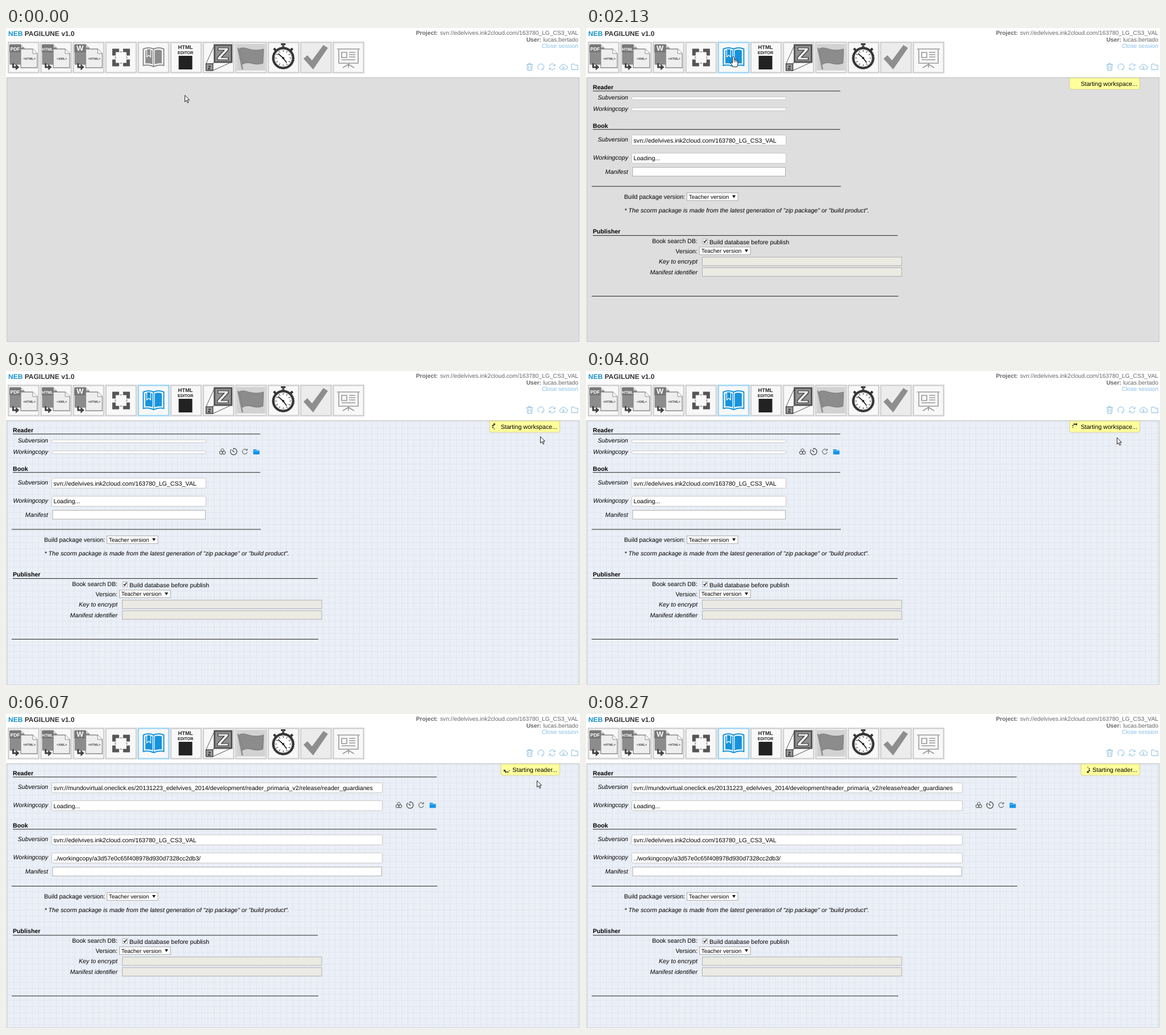
An HTML page for the animation above (8390 ms loop, 1009x555 px).

```html
<!DOCTYPE html>
<html lang="en">
<head>
<meta charset="utf-8">
<title>Workspace start-up</title>
<style>
  html, body { margin: 0; width: 100%; height: 100%; overflow: hidden; background: #fff; }
  svg { display: block; }
  text { font-family: "Liberation Sans", Arial, sans-serif; font-size: 10.65px; text-rendering: geometricPrecision; white-space: pre; }
  .b { font-weight: bold; }
  .i { font-style: italic; }
  .title { font-size: 12px; fill: #333; }
  .title tspan { fill: #1590cc; }
  .head { font-size: 10.3px; fill: #666; }
  .link { fill: #86bfe4; }
  .small { font-size: 10px; }
  .tip { font-size: 9px; fill: #555; }
</style>
</head>
<body>
<svg id="stage" width="1009" height="555" viewBox="0 0 1009 555"></svg>
<script>
const LOOP = 8390, STEP = 200 / 3;
const CLICK = 1800, FORM = 2000, NOTICE = 2130, IMAGES = 2200, READER = 6070;
const BOOK_URL = 'svn://edelvives.ink2cloud.com/163780_LG_CS3_VAL';
const READER_URL = 'svn://mundovirtual.oneclick.es/20131223_edelvives_2014/development/reader_primaria_v2/release/reader_guardianes';

const text = (x, y, s, cls = '', attrs = '') => `<text x="${x}" y="${y}" class="${cls}" ${attrs}>${s}</text>`;
const right = (x, y, s, cls) => text(x, y, s, cls, 'text-anchor="end"');
const mid = (x, y, s, size, fill) =>
  text(x, y, s, 'b', `text-anchor="middle" style="font-size:${size}px" fill="${fill}"`);
const rect = (x, y, w, h, fill, stroke = 'none', attrs = '') =>
  `<rect x="${x}" y="${y}" width="${w}" height="${h}" fill="${fill}" stroke="${stroke}" ${attrs}/>`;
const path = (d, fill = 'none', stroke = 'none', width = 1) =>
  `<path d="${d}" fill="${fill}" stroke="${stroke}" stroke-width="${width}"/>`;
const circle = (x, y, r, fill, stroke = 'none', attrs = '') =>
  `<circle cx="${x}" cy="${y}" r="${r}" fill="${fill}" stroke="${stroke}" ${attrs}/>`;
const group = (body, attrs) => `<g ${attrs}>${body}</g>`;
const at = (x, y, body) => group(body, `transform="translate(${x} ${y})"`);
const spun = (count, body) => [...Array(count)].map((_, k) =>
  group(body, `transform="rotate(${k * 360 / count})"`)).join('');

// Toolbar icons, drawn inside a 56 x 56 button
const convert = (from, fromSize, to) =>
  path('M4 5H23L29 11V40H4Z', '#8c8c8c', '#777') + path('M23 5V11H29', '#ddd', '#777') +
  rect(3, 6, 20, 13, '#777') + mid(13, 16, from, fromSize, '#fff') +
  path('M23 13H44L52 21V46H23Z', '#eee', '#8a8a8a', 1.3) + path('M44 13V21H52', '#fff', '#8a8a8a') +
  mid(38, 32.2, `&lt;${to}>`, 5.5, '#444') +
  path('M9.5 38V45H15', 'none', '#444', 3) + path('M14 39.5L20.5 45 14 50.5Z', '#444');

const corners = at(28, 28, spun(4,
  path('M-12.5 -3.5V-12.5H-3.5', 'none', '#555', 6) + path('M-2 -10H2', 'none', '#aaa', 2)));

const book = color =>
  path('M10 13Q19 9 28 13Q37 9 46 13V42Q37 40 28 44Q19 40 10 42Z', '#fff', color, 2) +
  path('M13.5 15.5Q20 13 26 15.5V40Q20 37.5 13.5 38.5Z', color) +
  path('M16 13V27L19.5 24 23 27V13Z', color, '#fff', 1.2) +
  path('M30 15.5Q36 13 42.5 15.5V38.5Q36 37.5 30 40Z', color) +
  path('M28 13V44', 'none', color, 1.4);

const editor = mid(27, 13, 'HTML', 9.3, '#222') + mid(27, 21.5, 'EDITOR', 7.3, '#222') + rect(15, 25, 24, 24, '#222');

const zoom =
  path('M6 39L21 6M18 39L51 6M6 51L21 36M18 51L51 36', 'none', '#555') +
  rect(21, 6, 30, 30, '#909090', '#555', 'stroke-width="3"') +
  path('M27 11H45V15L33 28H45V32H26V28L38 15H27Z', '#eee', '#333', 1.2) +
  rect(6, 39, 12, 12, '#999', '#444', 'stroke-width="1.5"') + mid(12, 49, 'Z', 9, '#222');

const flag = rect(3, 4, 50, 47, '#d2d2d2') +
  path('M5 11L13 49', 'none', '#8c8c8c', 2.5) +
  path('M7 13C18 6 26 20 50 13L49 38C32 44 25 32 13 40Z', '#8c8c8c', '#777');

const stopwatch = rect(23.5, 3, 8, 3, '#333') + rect(25.5, 5, 4, 5, '#555') +
  path('M11 12L15 16M44 12L40 16', 'none', '#333', 4) +
  at(27.5, 29, circle(0, 0, 17.5, '#fff', '#333', 'stroke-width="4"') +
    circle(0, 0, 19.5, 'none', '#555', 'stroke-dasharray="2 2"') +
    circle(0, 0, 15, 'none', '#bbb') + spun(12, path('M0 -14V-11', 'none', '#333')) +
    path('M-9 -8L0 0 6 8', 'none', '#222', 1.8) + circle(0, 0, 2, '#222'));

const tick = rect(3, 3, 50, 50, '#ececec') + path('M6 30L13 24 21 33 41 6 49 11 23 49Z', '#8e8e8e');

const board = path('M8 13H48M11 14V38H45V14M28 38V46M28 40L18 46M28 40L38 46' +
  'M16 19H25V28H16ZM29 19H40M29 23H40M29 27H40M16 32H40', 'none', '#999', 1.6);

const icons = [convert('PDF', 8.5, 'HTML'), convert('HTML', 7, 'XML'), convert('W', 13, 'HTML'),
  corners, book('#8c8c8c'), editor, zoom, flag, stopwatch, tick, board];
const button = (n, icon, border = '#d2d2d2') =>
  at(3 + n * 57.1, 24, rect(1.3, 1.3, 53.4, 53.4, '#f8f8f8', border, 'stroke-width="2.6"') + icon);

// Small line icons, centred on the origin
const actions = [
  'M-5.5 -4H5.5M-2 -4V-6H2V-4M-4.5 -4L-3.7 6H3.7L4.5 -4M-1.7 -2V4M1.7 -2V4',
  'M-3 4.6A5.4 5.4 0 1 1 3 4.6M.5 5H3.3V2',
  'M-5 -1A5 5 0 0 1 4.5 -2.5M5 -5V-2H2M5 1A5 5 0 0 1 -4.5 2.5M-5 5V2H-2',
  'M-3.5 4.5A3 3 0 0 1 -4 -1.5A4.2 4.2 0 0 1 4 -2A3.2 3.2 0 0 1 3.7 4.5ZM0 -2V3M-2 1L0 3 2 1',
  'M-5.5 5V-5H-1L.5 -3H5.5V5Z'
].map((d, k) => at(920.5 + k * 19.8, 68.5, path(d, 'none', '#84badf'))).join('');

const header = text(4, 14, '<tspan>NEB</tspan> PAGILUNE v1.0', 'b title') +
  right(759, 12, 'Project:', 'head b') + right(1006, 12, BOOK_URL, 'head') +
  right(941, 23.5, 'User:', 'head b') + right(1006, 23.5, 'lucas.bertado', 'head') +
  right(1006, 35, 'Close session', 'head link') + actions;

// Form pieces
const rule = (x, y, end) => path(`M${x} ${y}H${end}`, 'none', '#222');
const field = (y, w, h, value = '') =>
  rect(80.5, y, w, h, '#fff', '#c6c6c6', 'rx="2"') + text(83.5, y + h / 2 + 4, value);
const select = (x, y) => rect(x, y, 89.5, 13.5, '#fff', '#a9a9a9') +
  text(x + 3.2, y + 10.4, 'Teacher version', 'small') + path(`M${x + 79.5} ${y + 4.2}h6l-3 5z`, '#111');
const locked = y => rect(204.5, y, 350.5, 15, '#ebebe4', '#b0b0b0');

const rowIcons = (x, y) =>
  at(x, y + .5, spun(3, circle(0, -2.8, 2.7, 'none', '#444', 'stroke-width=".9"'))) +
  at(x + 19.6, y, path('M-4.2 -3.8A5.7 5.7 0 1 0 0 -5.7V-3.5M-2.5 -2.5L1 1', 'none', '#333', 1.1)) +
  at(x + 39.4, y, path('M4.3 1A4.4 4.4 0 1 1 3 -3.2M4.2 -5V-2.2H1.4', 'none', '#444')) +
  at(x + 59.6, y, path('M-5.5 5V-4H-.5L1 -2.5H5.5V5Z', '#1593ea') + path('M-5 -1.5H5.5', 'none', '#8bcaf5'));

const form = wide => {
  const extra = wide ? 310 : 0, w = 271 + extra, down = wide ? 24.3 : 0;
  const label = (y, s) => right(74, y, s, 'i');
  const reader = text(12, 107.5, 'Reader', 'b') + rule(12, 111, 447 + extra) +
    label(wide ? 132 : 126, 'Subversion') + label(wide ? 164 : 146, 'Workingcopy') +
    (wide ? field(121.3, w, 17.5, READER_URL) + field(152.7, w, 17.7, 'Loading...')
          : field(121.3, w, 5) + field(140.8, w, 5));
  const rest = text(12, 175.5, 'Book', 'b') + rule(12, 178.7, 447 + extra) +
    label(200, 'Subversion') + field(188.6, w, 17.8, BOOK_URL) +
    label(232, 'Workingcopy') +
    field(220.5, w, 17.8, wide ? '../workingcopy/a3d57e0c65f408978d930d7328cc2db3/' : 'Loading...') +
    label(256.7, 'Manifest') + rect(82, 245.5, w - 2.5, 15.5, '#fff', '#adadad') +
    rule(10, 279, 448 + extra) +
    text(67, 300.7, 'Build package version:') + select(177.5, 290.5) +
    text(67.5, 325, '* The scorm package is made from the latest generation of "zip package" or "build product".', 'i') +
    text(12, 362, 'Publisher', 'b') + rule(12, 365.6, 548) +
    right(196, 379, 'Book search DB:') + rect(205, 371.5, 8.5, 8.5, '#fff', '#aaa') +
    path('M206.8 375.5L208.6 377.8 212 373', 'none', '#333', 1.6) +
    text(217, 380.7, 'Build database before publish') +
    right(196, 396.7, 'Version:') + select(199.5, 386) +
    right(196, 414.7, 'Key to encrypt', 'i') + locked(403.7) +
    right(196, 433.5, 'Manifest identifier', 'i') + locked(422.5) +
    rule(10, 472.5, 549);
  return reader + at(0, down, rest);
};

const notice = (x, s) =>
  path(`M${x} 88V105Q${x} 108 ${x + 3} 108H970.5Q973.5 108 973.5 105V88Z`, '#ffff9c', '#cfcf9a') +
  right(969, 102, s);

// Comet of four shrinking dots, its middle pointing along the x axis
const comet = [1.7, 1.4, 1.1, .8].map((r, k) => {
  const a = (67.5 - k * 45) * Math.PI / 180;
  return circle(4.5 * Math.cos(a), 4.5 * Math.sin(a), r, '#222');
}).join('');

const layer = (id, body) => group(body, `id="${id}"`);
document.getElementById('stage').innerHTML =
  `<defs><pattern id="grid" width="10.65" height="10.65" patternUnits="userSpaceOnUse" x="3" y="89">
    <rect width="11" height="11" fill="#ebeff7"/><path d="M0 .5H11M.5 0V11" stroke="#e0e5ee"/></pattern></defs>` +
  header + icons.map((icon, n) => button(n, icon)).join('') +
  layer('selected', button(4, book('#1593dc'), '#a3d8f5')) +
  rect(1.5, 87.5, 1006, 465.5, '#dedede', '#bfbfbf') +
  layer('paper', rect(2, 88, 1005, 464.5, 'url(#grid)')) +
  layer('narrow', form(false)) + layer('narrowIcons', rowIcons(380.5, 142)) +
  layer('wide', form(true) + rowIcons(690.5, 160.5)) +
  layer('workspaceNotice', notice(850, 'Starting workspace...')) +
  layer('readerNotice', notice(870, 'Starting reader...')) +
  layer('spinner', comet) +
  layer('tooltip', rect(258.5, 69.5, 39, 16, '#fff', '#888') + text(264, 80.5, 'Reader', 'tip')) +
  layer('arrow', path('M.5 .5V12L3.2 9.5 5.1 13.9 6.9 13.1 5 8.8H8.5Z', '#fff', '#222')) +
  layer('hand', path('M-1.5 10V1.2Q0 -.6 1.3 1.2V6Q3 5 3.8 6.7Q5.5 5.8 6.2 7.4Q8 6.9 8 9V13L6.5 18.5H-.5L-4.3 12.2Q-4.6 10 -2.8 10.5L-1.5 12Z', '#fff', '#222') +
    path('M1.3 6V10M3.8 7V10.5M6.2 7.5V10.8', 'none', '#222', .8));

const el = id => document.getElementById(id);
const show = (id, on) => el(id).setAttribute('visibility', on ? 'visible' : 'hidden');
const move = (id, x, y, angle = 0) => el(id).setAttribute('transform', `translate(${x} ${y}) rotate(${angle})`);

// Pointer stops: time, x, y
const route = [[0, 314, 118], [530, 259, 50], [3070, 259, 50], [3270, 410, 130], [3470, 690, 186],
  [3530, 702, 187], [3670, 915, 135], [3730, 971, 115], [3930, 939, 115], [4200, 933, 117],
  [7250, 933, 117], [7530, 610, 290], [7800, 154, 540], [7870, 150, 570], [LOOP, 150, 570]];
const pointer = t => {
  const n = route.findIndex(stop => stop[0] > t);
  const [t0, x0, y0] = route[n - 1], [t1, x1, y1] = route[n];
  const k = (t - t0) / (t1 - t0);
  return [x0 + (x1 - x0) * k, y0 + (y1 - y0) * k];
};

function draw(now) {
  const t = now % LOOP, reading = t >= READER;
  show('selected', t >= CLICK);
  show('paper', t >= IMAGES);
  show('narrow', t >= FORM && !reading);
  show('narrowIcons', t >= IMAGES && !reading);
  show('wide', reading);
  show('workspaceNotice', t >= NOTICE && !reading);
  show('readerNotice', reading);

  show('spinner', t >= IMAGES);
  const spin = Math.round((t - (reading ? READER : IMAGES)) / 100) * 45;
  move('spinner', reading ? 880.5 : 860, 98, spin + (reading ? 90 : 135));

  el('tooltip').setAttribute('opacity', t < CLICK ? Math.max(0, Math.min(1, (t - 810) / 260)) : 0);

  const [x, y] = pointer(Math.min(LOOP - 1, Math.floor((t + 4) / STEP) * STEP));
  const overButton = x > 232 && x < 288 && y < 79;
  show('hand', overButton);
  show('arrow', !overButton);
  move('hand', x, y);
  move('arrow', x, y);
}

function animate() {
  draw(performance.now());
  requestAnimationFrame(animate);
}
animate();
</script>
</body>
</html>
```
